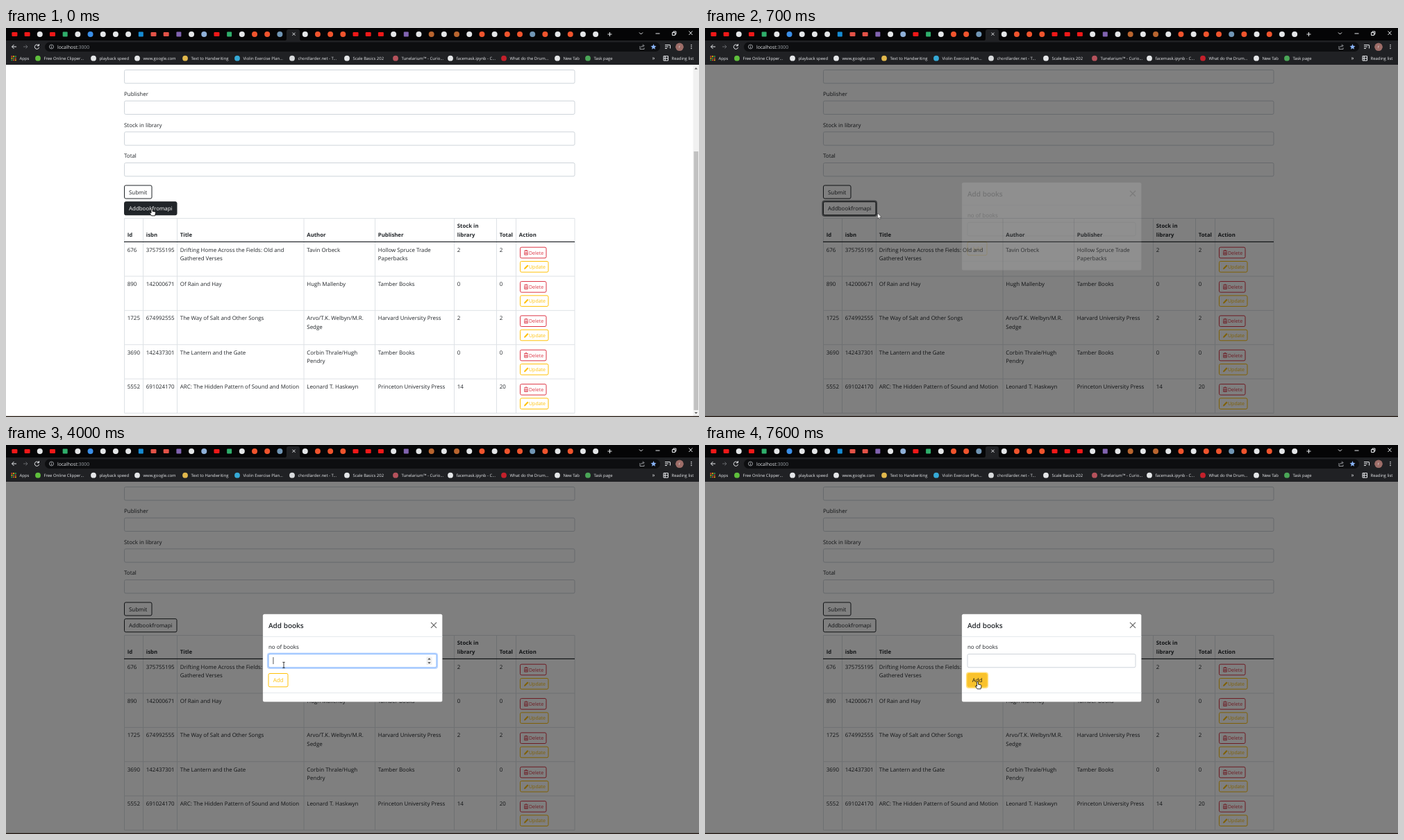
An HTML page for the animation above (8 s loop, 998 by 561 pixels).

```html
<!DOCTYPE html>
<html lang="en">
<head>
<meta charset="utf-8">
<title>Library form</title>
<style>
  html, body { margin: 0; width: 100%; height: 100%; overflow: hidden; background: #fff; }
  svg { display: block; width: 100vw; height: 100vh; }
  text { font-family: "Open Sans", "Noto Sans", sans-serif; font-size: 7.95px; fill: #212529;
         white-space: pre; text-rendering: geometricPrecision; }
  .bold { font-weight: 700; font-size: 7.75px; }
  .small { font-size: 7px; }
  .title { font-weight: 600; font-size: 10px; }
  .bar { font-size: 5.95px; fill: #e8eaed; }
  .line { fill: none; stroke: #e8eaed; stroke-width: 1; }
</style>
</head>
<body>
<svg id="stage" viewBox="0 0 998 561" preserveAspectRatio="none"></svg>
<script>
const LOOP = 8000, STEP = 100;
const DARK = '#212529', RED = '#dc3545', YELLOW = '#ffc107';

const text = (x, y, s, cls = '', more = '') => `<text x="${x}" y="${y}" class="${cls}" ${more}>${s}</text>`;
const rect = (x, y, w, h, fill, more = '') =>
  `<rect x="${x}" y="${y}" width="${w}" height="${h}" fill="${fill}" ${more}/>`;
const box = (x, y, w, h, stroke, more = '') => rect(x, y, w, h, 'none', `rx="2" stroke="${stroke}" ${more}`);
const disc = (x, y, r, fill) => `<circle cx="${x}" cy="${y}" r="${r}" fill="${fill}"/>`;
const path = (d, more = '') => `<path d="${d}" ${more}/>`;
const line = d => path(d, 'class="line"');

// Browser frame
const tabColors = {
  R: '#f01818', w: '#e4e6e8', g: '#2fae6b', b: '#3b8fe8', B: '#168bd2', m: '#e35247',
  p: '#8163b0', d: '#8fb0d8', o: '#f0542d', s: '#7196b5', k: '#b9652f'
};
const tabs = 'RRwRgwbwwwBmmpwdRgwoos_woooRRRwpwkwkwowoosowoww';

const bookmarks = [
  [46, 'Free Online Clipper...', '#5fbf3c'], [126, 'playback speed', '#e4e6e8'],
  [189, 'www.google.com', '#e4e6e8'], [258, 'Text to Handwriting', '#e2b84c'],
  [333, 'Violin Exercise Plan...', '#35a9d6'], [412, 'chordlarder.net - T...', '#d8dadc'],
  [491, 'Scale Basics 202', '#e4e6e8'], [561, 'Tunelarium™ - Curio...', '#b5525c'],
  [640, 'facemask.ipynb - C...', '#e4e6e8'], [717, 'What do the Drum...', '#c3202b'],
  [794, 'New Tab', '#e4e6e8'], [838, 'Task page', '#4aa657']
];

function browser() {
  let s = rect(0, 0, 998, 53, '#202124') + rect(0, 0, 998, 18, '#050506');
  s += path('M402 18Q404 18 404 15V5Q404 2 407 2H420Q423 2 423 5V15Q423 18 425 18Z', 'fill="#202124"');
  [...tabs].forEach((c, i) => {
    const x = 12.4 + 18.19 * i;
    if (c === 'R' || c === 'm') s += rect(x - 4, 6, 8, 6, tabColors[c], 'rx="1.2"');
    else if ('gBp'.includes(c)) s += rect(x - 3.5, 5.5, 7, 7, tabColors[c], 'rx="1"');
    else if (c !== '_') s += disc(x, 9, 4, tabColors[c]);
  });
  s += line('M412.5 6.7 416.5 10.7M416.5 6.7 412.5 10.7M866.5 9H872.5M869.5 6V12');
  s += line('M912 6.5 914.5 9 917 6.5M935.5 8H941.5M959.5 6.5H963.5V10.5H959.5ZM961 6.5V5H965V9H963.5M983.5 4.5 988.5 10M988.5 4.5 983.5 10');
  s += rect(56, 20.5, 886, 13.5, '#0d0e10', 'rx="6.7"');
  s += line('M15 27H8.5M11.5 24 8.5 27 11.5 30M47 25.2A3.2 3.2 0 1 0 47.6 28M47.5 23V25.8H44.8');
  s += path('M25 27H31M28.5 24.5 31 27 28.5 29.5', 'fill="none" stroke="#66696d"');
  s += path('M62.5 27A3 3 0 1 0 68.5 27A3 3 0 1 0 62.5 27M65.5 26.5V29M65.5 25V25.8',
    'fill="none" stroke="#b9bcc0" stroke-width=".8"');
  s += text(74, 29.7, 'localhost<tspan fill="#9aa0a6">:3000</tspan>', 'bar', 'style="font-size:6.85px"');
  s += path('M913 26V30.5H919V28.5M914.5 28Q915 25.5 918.5 25.5M917 23.5 919 25.5 917 27.5',
    'fill="none" stroke="#b9bcc0" stroke-width=".8"');
  s += path('M932.5 23 933.6 25.8 936.5 26 934.3 27.9 935 30.8 932.5 29.2 930 30.8 930.7 27.9 928.5 26 931.4 25.8Z',
    'fill="#8ab4f8"');
  s += line('M949 24.5H956M949 27H954M949 29.5H952M956.5 24.5V29.5');
  s += disc(970, 27.3, 5.8, '#9d6d68') + text(970, 29.4, 'r', 'bar', 'text-anchor="middle"');
  for (const y of [24.5, 27, 29.5]) s += disc(987, y, .8, '#e8eaed');
  const dots = ['#ea4335', '#fbbc05', '#34a853'];
  for (let i = 0; i < 9; i++)
    s += rect(7.5 + i % 3 * 2.7, 40 + (i / 3 | 0) * 2.7, 1.8, 1.8, dots[(i + (i / 3 | 0)) % 3]);
  s += text(19.5, 46, 'Apps', 'bar');
  for (const [x, label, color] of bookmarks) s += disc(x, 43.7, 3.9, color) + text(x + 8.4, 46, label, 'bar');
  s += text(930.5, 46, '»', 'bar', 'style="font-size:8px"');
  s += line('M947 40.5H953.5V47H947ZM949.3 40.5V47M947 43.7H953.5') + text(958.5, 46, 'Reading list', 'bar');
  return s;
}

// Page
const columns = [170.5, 197.5, 246.5, 429, 531.5, 645.5, 706.5, 734.5, 819];
const cellX = columns.map(x => x + 4.3);
const rowHeight = 49.35;
const books = [
  ['676', '375755195', 'Drifting Home Across the Fields: Old and|Gathered Verses', 'Tavin Orbeck', 'Hollow Spruce Trade|Paperbacks', '2', '2'],
  ['890', '142000671', 'Of Rain and Hay', 'Hugh Mallenby', 'Tamber Books', '0', '0'],
  ['1725', '674992555', 'The Way of Salt and Other Songs', 'Arvo/T.K. Welbyn/M.R.|Sedge', 'Harvard University Press', '2', '2'],
  ['3690', '142437301', 'The Lantern and the Gate', 'Corbin Thrale/Hugh|Pendry', 'Tamber Books', '0', '0'],
  ['5552', '691024170', 'ARC: The Hidden Pattern of Sound and Motion', 'Leonard T. Haskwyn', 'Princeton University Press', '14', '20']
];

const cell = (x, y, s, cls) => s.split('|').map((part, i) => text(x, y + i * 12.4, part, cls)).join('');

function rowButtons(y) {
  const fill = c => `style="fill:${c}"`;
  return box(740.5, y - 6.9, 37.5, 15.6, RED) + text(753, y + 3.5, 'Delete', 'small', fill(RED)) +
    path(`M746 ${y - 1.7}H752M748 ${y - 2.5}H750M746.7 ${y - .5}V${y + 4}H751.3V${y - .5}M748.2 ${y}V${y + 3}M749.8 ${y}V${y + 3}`,
      `fill="none" stroke="${RED}" stroke-width=".9"`) +
    box(740.5, y + 13.4, 40.5, 15.6, YELLOW) + text(753, y + 23.8, 'Update', 'small', fill(YELLOW)) +
    path(`M746 ${y + 25}L746.5 ${y + 23} 751 ${y + 18.3} 752.5 ${y + 19.8} 748 ${y + 24.5}Z`, `fill="${YELLOW}"`);
}

function page() {
  let s = rect(0, 53, 998, 508, '#fff');
  ['', 'Publisher', 'Stock in library', 'Total'].forEach((label, i) => {
    const y = 60.5 + i * 44.67;
    s += text(170, y - 7.3, label) + box(170.5, y, 648.5, 19.3, '#ced4da');
  });
  s += box(170.5, 227, 39.5, 19, DARK) + text(177, 239.6, 'Submit');
  s += rect(169.5, 249.5, 77.5, 21.5, 'none', `id="addRing" rx="3" stroke="${DARK}" stroke-width="2.2" stroke-opacity=".6"`);
  s += box(170.5, 250.7, 75.5, 19, DARK) + rect(170.5, 250.7, 75.5, 19, DARK, 'id="addFill" rx="2"');
  s += text(177, 263.2, 'Addbookfromapi', '', 'id="addText"');

  const rows = [274.5, ...books.map((_, i) => 358 + i * rowHeight)];
  s += path(columns.map(x => `M${x} 274.5V555.5`).join('') + rows.map(y => `M170.5 ${y}H819`).join(''),
    'fill="none" stroke="#dee2e6"');
  s += rect(170, 307.8, 649, 1.2, DARK);
  ['Id', 'isbn', 'Title', 'Author', 'Publisher', 'Stock in|library', 'Total', 'Action'].forEach((h, i) =>
    s += cell(cellX[i], h.includes('|') ? 288.3 : 300.7, h, 'bold'));
  books.forEach((book, r) => {
    const y = 322.7 + r * rowHeight;
    book.forEach((value, i) => s += cell(cellX[i], y, value));
    s += rowButtons(y + .4);
  });
  return s;
}

const scrollbar = `<g id="scrollbar">${rect(989.5, 53, 8.5, 507, '#f1f1f1')}${rect(990.5, 178, 6.5, 373, '#c1c1c1')}
  ${path('M991.5 59.5 993.7 57 996 59.5ZM991.5 554 993.7 556.5 996 554Z', 'fill="#606060"')}</g>`;

const modal = `<g id="modal">
  ${rect(369.8, 243.8, 258.7, 126.7, '#fff', 'rx="2.5" stroke="#000" stroke-opacity=".2" stroke-width=".6"')}
  ${path('M370 276.3H628.5M370 357.5H628.5', 'stroke="#dee2e6" stroke-width=".8"')}
  ${text(378, 263.7, 'Add books', 'title')}
  ${path('M612 255.8 620 263.8M620 255.8 612 263.8', 'stroke="#666" stroke-width="1.2"')}
  ${text(378, 294, 'no of books')}
  ${rect(377, 300.5, 244, 21.5, 'none', 'id="inputRing" rx="3" stroke="#0d6efd" stroke-opacity=".28" stroke-width="2.2"')}
  ${box(378, 301.5, 242, 19.3, '#ced4da', 'id="input"')}
  <g id="spinner">${rect(605.5, 305.5, 8, 11.5, '#efefef')}
  ${path('M607.3 309.6 609.5 307.2 611.7 309.6ZM607.3 313.2 609.5 315.6 611.7 313.2Z', 'fill="#404040"')}</g>
  ${text(384.7, 314, '', '', 'id="value"')}
  ${rect(384.6, 306, .7, 10, '#111', 'id="caret"')}
  ${rect(377, 328.5, 30, 21.5, 'none', `id="submitRing" rx="3" stroke="${YELLOW}" stroke-opacity=".5" stroke-width="2.2"`)}
  ${box(378, 329.5, 28, 19.3, YELLOW)}
  ${rect(378, 329.5, 28, 19.3, '#f9c22c', 'id="submitFill" rx="2"')}
  ${text(384.7, 342.2, 'Add', '', 'id="submitText"')}
</g>`;

const cursors = `<g id="cursor">
  ${path('M-1 1Q0-.7 1 1V4.2L4.7 5Q5.6 5.3 5.5 6.6L4.6 10.8H-.4L-3.2 6.8Q-3 5.5-1 7Z',
    'id="hand" fill="#fff" stroke="#000" stroke-width=".8"')}
  ${path('M0 0V8L1.9 6.3 3.2 9 4.4 8.4 3.2 5.8H5.6Z', 'id="arrow" fill="#fff" stroke="#000" stroke-width=".4"')}
  ${path('M-1.7-4H1.7M0-4V4M-1.7 4H1.7', 'id="beam" fill="none" stroke="#111" stroke-width=".8"')}
</g>`;

const stage = document.getElementById('stage');
stage.innerHTML = page() + scrollbar + rect(0, 53, 998, 507, '#000', 'id="backdrop"') + browser() +
  rect(0, 559.7, 998, 1.3, '#21160f') + modal + cursors;

// Animation
const el = {};
for (const node of stage.querySelectorAll('[id]')) el[node.id] = node;

const ramp = (t, a, b) => Math.min(1, Math.max(0, (t - a) / (b - a)));
const opacity = (name, v) => el[name].setAttribute('opacity', v);
const mix = (a, b, p) => `rgb(${a.map((v, i) => Math.round(v + (b[i] - v) * p))})`;

const mousePath = [
  [500, 210, 260], [600, 222.5, 262], [700, 248.5, 267], [900, 312, 288], [1100, 357, 302],
  [1400, 386, 311], [1900, 400, 317.3], [5900, 400, 317.3], [6300, 396, 331], [6600, 392.5, 341]
];
const caretToggles = [1900, 2400, 3000, 3300, 4000, 4500, 4800, 5800, 6300, 6900];

function mouseAt(t) {
  const next = mousePath.findIndex(k => k[0] > t);
  if (next === 0) return mousePath[0].slice(1);
  if (next < 0) return mousePath.at(-1).slice(1);
  const [t0, x0, y0] = mousePath[next - 1], [t1, x1, y1] = mousePath[next];
  const p = ramp(t, t0, t1);
  return [x0 + (x1 - x0) * p, y0 + (y1 - y0) * p];
}

function draw(now) {
  const t = Math.floor(now % LOOP / STEP) * STEP;

  // Outlined button: hover fill fades away under the backdrop
  const hover = 1 - ramp(t, 470, 620);
  opacity('addFill', hover);
  el.addText.style.fill = mix([33, 37, 41], [255, 255, 255], hover);
  opacity('addRing', ramp(t, 250, 400) * (1 - ramp(t, 970, 1120)));
  opacity('scrollbar', t < 500 ? 1 : 0);
  opacity('backdrop', .5 * ramp(t, 435, 635));

  const slide = -26 * (1 - ramp(t, 670, 970)) ** 2;
  opacity('modal', ramp(t, 682, 832));
  el.modal.setAttribute('transform', `translate(0 ${slide})`);

  const [x, y] = mouseAt(t);
  const overInput = t >= 1000 && x > 378 && y > 301 && y < 321;
  const overSubmit = y > 329.5 && t > 5900;
  const kind = t < 500 || overSubmit ? 'hand' : overInput ? 'beam' : 'arrow';
  for (const name of ['hand', 'arrow', 'beam']) opacity(name, name === kind ? 1 : 0);
  el.cursor.setAttribute('transform', `translate(${x} ${y})`);

  const focus = ramp(t, 1850, 2000) * (1 - ramp(t, 6850, 7000));
  opacity('inputRing', focus);
  el.input.setAttribute('stroke', mix([206, 212, 218], [134, 183, 254], focus));
  opacity('spinner', focus > 0 || overInput ? 1 : 0);
  const value = t < 4800 || t >= 7200 ? '' : t < 5000 ? '1' : '19';
  el.value.textContent = value;
  el.caret.setAttribute('x', 384.6 + value.length * 4.5);
  opacity('caret', caretToggles.filter(k => k <= t).length % 2);

  const filled = ramp(t, 6250, 6400);
  opacity('submitFill', filled);
  el.submitText.style.fill = mix([255, 193, 7], [20, 20, 20], filled);
  opacity('submitRing', ramp(t, 6850, 7000));
}

function frame() {
  draw(performance.now());
  requestAnimationFrame(frame);
}
frame();
</script>
</body>
</html>
```
